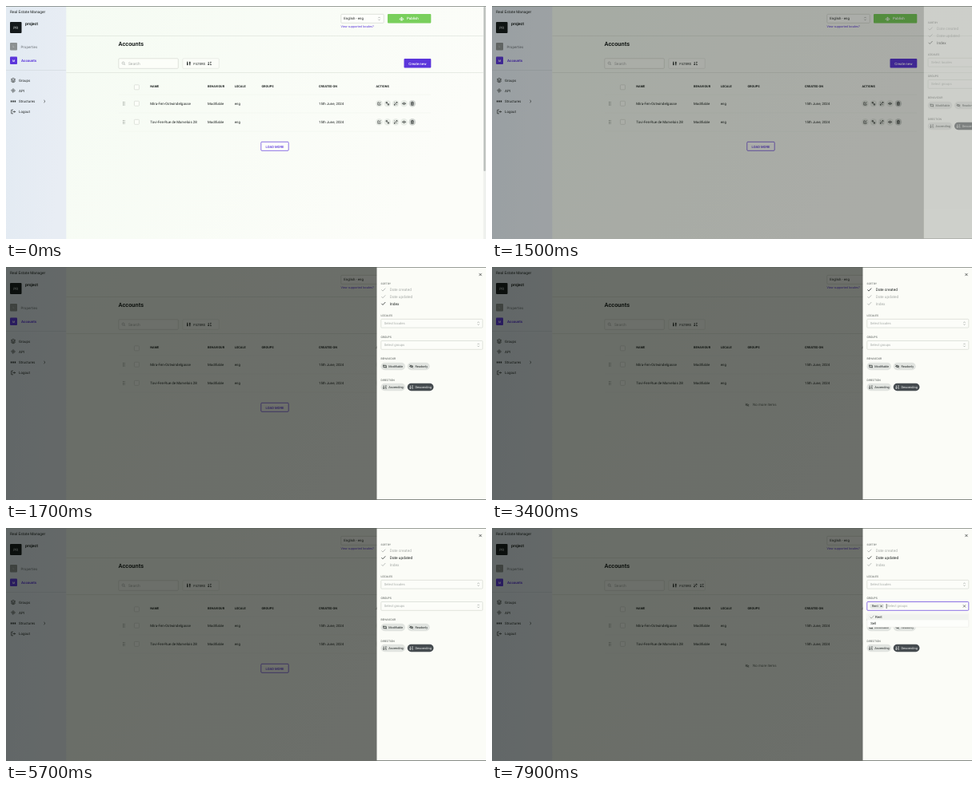
An HTML page that plays this animation: 600 by 292 pixels, repeating every 8 s.

```html
<!DOCTYPE html>
<html lang="en">
<head>
<meta charset="utf-8">
<title>Accounts</title>
<style>
  html, body { margin: 0; width: 100%; height: 100%; overflow: hidden; background: #f9fcf6; }
  svg { display: block; width: 100vw; height: 100vh; }
  text { font-family: Roboto, "Open Sans", sans-serif; text-rendering: geometricPrecision; white-space: pre; }
</style>
</head>
<body>
<svg id="stage" viewBox="0 0 600 292" preserveAspectRatio="none"></svg>
<script>
const LOOP = 8000, FRAME = 100, DRAWER_W = 136.5;
const INK = '#1f2423', PURPLE = '#5c36db', MUTED = '#a6aaa7', LINE = '#d5d9d2';

const ICONS = {
  check: 'M-2.4 0 L-.8 1.7 L2.5 -1.8',
  close: 'M-1.6 -1.6 L1.6 1.6 M1.6 -1.6 L-1.6 1.6',
  right: 'M-.8 -1.5 L.8 0 L-.8 1.5',
  updown: 'M-1.1 -.8 L0 -2 L1.1 -.8 M-1.1 .8 L0 2 L1.1 .8',
  search: 'M1.1 -.4 A1.5 1.5 0 1 1 -1.9 -.4 A1.5 1.5 0 1 1 1.1 -.4 M.7 .7 L2 2',
  sort: 'M-1.3 -2 V2 M-2.2 1 L-1.3 2 L-.4 1 M.5 -1.6 H2.2 M.5 0 H1.8 M.5 1.6 H2.4',
  sliders: 'M-1.5 -2.3 V2.3 M1.5 -2.3 V2.3 M-2.3 .9 H-.7 M.7 -.9 H2.3',
  layers: 'M0 -2.6 L2.6 -1.2 L0 .2 L-2.6 -1.2 Z M-2.6 .2 L0 1.6 L2.6 .2 M-2.6 1.5 L0 2.9 L2.6 1.5',
  hub: 'M0 -2.4 L2.4 0 L0 2.4 L-2.4 0 Z M-.8 0 H.8 M0 -.8 V.8',
  blocks: 'M-2.4 -.9 V.9 M0 -.9 V.9 M2.4 -.9 V.9',
  exit: 'M0 -2.3 H-2.3 V2.3 H0 M-.8 0 H2.6 M1.4 -1.2 L2.6 0 L1.4 1.2',
  edit: 'M.2 -1.5 H-1.7 V1.8 H1.5 V.3 M-.3 .4 L2 -1.9',
  link: 'M-1.8 -1.8 H-.4 V-.4 H-1.8 Z M.4 .4 H1.8 V1.8 H.4 Z M-.4 -.4 L.4 .4',
  expand: 'M.4 -1.8 H1.8 V-.4 M1.8 -1.8 L-1.8 1.8 M-.4 1.8 H-1.8 V.4 M-1.8 -1.6 L-.6 -.5 M.7 .8 L1.8 1.8',
  eye: 'M-2.3 0 Q0 -2.6 2.3 0 Q0 2.6 -2.3 0 Z M-.4 0 A.4 .4 0 1 0 .4 0 A.4 .4 0 1 0 -.4 0',
  bin: 'M-1.8 -1.3 H1.8 M-.6 -1.3 V-2 H.6 V-1.3 M-1.3 -1.3 V2 H1.3 V-1.3 M-.4 -.3 V1.1 M.4 -.3 V1.1',
  swap: 'M-2.2 -1.2 H1.7 V1.8 M2.2 1.2 H-1.6 V-1.9',
  hidden: 'M-2.2 0 Q0 -2.4 2.2 0 Q0 2.4 -2.2 0 Z M-2 -2 L2 2',
  globe: 'M-2.6 1 Q0 -3.6 2.6 1 M-2.6 1 H2.6 M0 -2 V2.2 M-1.4 2.2 H1.4'
};

const text = (s, x, y, size, fill = INK, weight = 400, extra = '') =>
  `<text x="${x}" y="${y}" font-size="${size}" fill="${fill}" font-weight="${weight}" ${extra}>${s}</text>`;
const centred = (s, x, y, size, fill, weight) => text(s, x, y, size, fill, weight, 'text-anchor="middle"');
const box = (x, y, w, h, fill, r = 0, stroke = 'none', extra = '') =>
  `<rect x="${x}" y="${y}" width="${w}" height="${h}" rx="${r}" fill="${fill}" stroke="${stroke}" stroke-width=".7" ${extra}/>`;
const icon = (name, x, y, stroke = INK, width = .65) =>
  `<path d="${ICONS[name]}" transform="translate(${x} ${y})" fill="none" stroke="${stroke}" stroke-width="${width}"/>`;
const rule = (x, y, w, fill) => box(x, y, w, .7, fill);
const group = (id, ...parts) => `<g id="${id}">${parts.join('')}</g>`;

function sidebar() {
  const links = [['layers', 'Groups', 93], ['hub', 'API', 106], ['blocks', 'Structures', 119.5], ['exit', 'Logout', 132.5]];
  return [
    box(0, 0, 75.3, 292, 'url(#side)'),
    text('Real Estate Manager', 5, 9.4, 4.8),
    box(5, 20, 14.5, 14, '#14191b', 1),
    centred('PR', 12.2, 28.6, 4.6, '#d5dad8'),
    text('project', 24, 24.3, 5.1, INK, 700),
    box(5, 46, 9, 9.5, '#8c9192', 1),
    centred('L', 9.5, 52, 3.6, '#d8dcdb'),
    text('Properties', 18.5, 52.6, 4.5, '#6d7378'),
    box(5, 63.5, 9, 9.5, PURPLE, 1),
    centred('M', 9.5, 69.5, 3.6, '#f0edff', 600),
    text('Accounts', 19, 70, 4.5, PURPLE, 600),
    rule(0, 80, 75, '#d3dae0'),
    ...links.map(([name, label, y]) => icon(name, 9, y, INK, name === 'blocks' ? 1.5 : .65) + text(label, 16, y + 1.6, 4.45)),
    icon('right', 48.2, 119.5)
  ].join('');
}

function header() {
  return [
    rule(75.3, 37.3, 525, '#dfe4db'), rule(75.3, 83.2, 525, '#dfe4db'),
    box(418.8, 10.3, 53.5, 11, '#fdfefb', 1, LINE),
    text('English - eng', 422.3, 17.4, 4.35),
    icon('updown', 466.5, 15.9, '#777d78', .5),
    text('View supported locales?', 418.5, 26.9, 3.8, PURPLE),
    box(477, 10, 54.3, 11.5, '#79cf5c', 1),
    icon('globe', 494.5, 15.8, '#fff', .7),
    text('Publish', 501, 17.4, 4.45, '#fff', 500),
    text('Accounts', 140.5, 49.6, 7.4, INK, 700),
    box(140.8, 65.8, 74.5, 12.5, '#fcfef9', 1, LINE),
    icon('search', 147, 72, '#959b96', .55),
    text('Search', 153, 73.6, 4.8, MUTED),
    box(220.8, 65.8, 45.5, 12.5, '#fbfdf8', 1, '#e3e7e0'),
    icon('sliders', 228.3, 72, INK, 1.1),
    text('FILTERS', 234.3, 73.5, 4.1),
    group('sortIcon', icon('sort', 254.5, 72, INK, .75)),
    group('filterMark', icon('expand', 254.2, 72, INK, .7)),
    box(497.5, 66, 33.8, 11.5, PURPLE, 1),
    centred('Create new', 514.4, 73.5, 4.4, '#fff', 500)
  ].join('');
}

function row(name, y) {
  const dots = [-1.8, 0, 1.8].map(d => box(146, y + d - .4, .8, .8, '#69706b') + box(147.7, y + d - .4, .8, .8, '#69706b')).join('');
  const actions = ['edit', 'link', 'expand', 'eye', 'bin'].map((a, i) => {
    const x = 466.5 + i * 10.35;
    return `<circle cx="${x}" cy="${y}" r="4.3" fill="${a === 'bin' ? '#d2d6d2' : '#e9ede7'}"/>` + icon(a, x, y, INK, .6);
  }).join('');
  return dots + box(160.4, y - 3.1, 6, 6, '#fcfef9', .8, LINE) + text(name, 180.3, y + 1.5, 4.5) +
    text('Modifiable', 252, y + 1.5, 4.35) + text('eng', 285.7, y + 1.5, 4.4) +
    text('15th June, 2024', 391, y + 1.5, 4.4) + actions + rule(141, y + 11.3, 390, '#f0f4ed');
}

function table() {
  const heads = [['NAME', 180.3], ['BEHAVIOUR', 252], ['LOCALE', 285.7], ['GROUPS', 319.5], ['CREATED ON', 391], ['ACTIONS', 462.5]];
  return [
    box(160.4, 98.8, 6, 6, '#fcfef9', .8, LINE),
    ...heads.map(([s, x]) => text(s, x, 102.3, 3.85, INK, 700)),
    rule(141, 110.7, 390, '#f0f4ed'),
    row('Mira-Fen-Ostwindelgasse', 122.3),
    row('Tovi-Fen-Rue de Marvelois 28', 145.4),
    group('more', box(318.8, 170.3, 34.4, 11, '#fdfefb', 1, PURPLE), centred('LOAD MORE', 336, 177.5, 4.15, PURPLE, 500)),
    group('noMore', icon('hidden', 319, 172.8, '#5f6660'), text('No more items', 326, 174.4, 4.5, '#5f6660'))
  ].join('');
}

function pill(x, y, w, name, label, size, dark) {
  const ink = dark ? '#f2f4f2' : INK;
  return box(x, y, w, 9.4, dark ? '#454b4f' : '#e1e4e0', 4.7) + icon(name, x + 5, y + 4.7, ink, .7) +
    text(label, x + 9.8, y + 6.1, size, ink);
}

function drawer() {
  const label = (s, y, size = 3.45) => text(s, 468.5, y, size, '#505653');
  const sorts = ['Date created', 'Date updated', 'Index'].map((s, i) => {
    const y = 28.4 + i * 8.7;
    return group('sort' + i, icon('check', 471.8, y, 'currentColor', .75), text(s, 479.8, y + 1.7, 4.8, 'currentColor'));
  });
  return [
    box(463.5, 0, DRAWER_W, 291.2, '#fbfcf7'),
    icon('close', 593, 9.5, INK, .65),
    label('SORT BY', 21.7, 3.2), ...sorts,
    label('LOCALES', 61.7),
    box(468.8, 65.3, 127, 10.8, '#fcfdf9', 1, LINE),
    text('Select locales', 472.8, 72.2, 4.2, MUTED),
    icon('updown', 590.5, 70.7, '#777d78', .5),
    label('GROUPS', 89),
    box(468.8, 92.5, 127, 10.8, '#fcfdf9', 1, LINE, 'id="field"'),
    group('tag', box(472, 94.6, 18, 6.6, '#e6e9e6', 3.3), text('Rent', 475, 99.2, 3.8),
      `<g transform="translate(486.6 97.9) scale(.75)">${icon('close', 0, 0, INK, .8)}</g>`),
    text('Select groups', 472.8, 99.4, 4.2, MUTED, 400, 'id="hint"'),
    box(472.4, 95, .6, 6, INK, 0, 'none', 'id="caret"'),
    group('arrows', icon('updown', 590.5, 97.9, '#777d78', .5)),
    group('clear', icon('close', 590.5, 97.9, INK, .55)),
    label('BEHAVIOUR', 116.3),
    pill(468.5, 119.8, 30.5, 'swap', 'Modifiable', 3.8),
    pill(501.7, 119.8, 28, 'hidden', 'Readonly', 3.8),
    label('DIRECTION', 142.6),
    pill(468.5, 145.8, 30.5, 'sort', 'Ascending', 3.95),
    pill(501.7, 145.8, 32.8, 'sort', 'Descending', 3.9, true),
    group('menu', box(468.8, 106.8, 127, 17.4, '#fdfefb', .8, '#eceeea'),
      group('picked', box(469.5, 107.8, 125.8, 7.6, '#f1f3ef'), icon('check', 475, 111.5, '#777d78', .6)),
      text('Rent', 473.3, 113, 4.3, INK, 400, 'id="rent"'), text('Sell', 473.3, 121.3, 4.3))
  ].join('');
}

const gradient = (id, a, b) =>
  `<linearGradient id="${id}" x2="1" y2=".3"><stop stop-color="${a}"/><stop offset="1" stop-color="${b}"/></linearGradient>`;

const stage = document.getElementById('stage');
stage.innerHTML = [
  '<defs>', gradient('page', '#f4fbf2', '#fcfdf9'), gradient('side', '#e2eaf2', '#e8edf4'), '</defs>',
  box(0, 0, 600, 292, 'url(#page)'),
  sidebar(), header(), table(),
  group('scrollbar', box(596.6, 0, 3.4, 292, '#eff1ee'), box(597, 1, 2.6, 206, '#bfc3c0', 1.2)),
  box(0, 0, 600, 292, '#060a05', 0, 'none', 'id="shade"'),
  group('drawer', drawer()),
  box(0, 0, 600, .6, '#59615b')
].join('');

const el = {};
stage.querySelectorAll('[id]').forEach(n => el[n.id] = n);
const show = (node, on) => node.setAttribute('opacity', +on);
const clamp = v => Math.min(1, Math.max(0, v));
const easeOut = v => 1 - (1 - clamp(v)) ** 2;
const during = (t, from, to) => t >= from && t < to;

function draw(t) {
  const open = easeOut((t - 1447) / 210);
  show(el.scrollbar, t < 1200);
  show(el.shade, .58 * clamp(open * 1.3));
  show(el.drawer, open);
  el.drawer.setAttribute('transform', `translate(${DRAWER_W * (1 - open)} 0)`);

  const chosen = t < 3400 ? 2 : t < 4600 ? 0 : 1;
  for (let i = 0; i < 3; i++) el['sort' + i].setAttribute('color', i === chosen ? INK : MUTED);

  // The list is briefly empty after each change of filter.
  const picked = t >= 7900;
  const loading = during(t, 3400, 3500) || during(t, 4600, 4700) || picked;
  show(el.more, !loading);
  show(el.noMore, loading);

  const focused = t >= 6000;
  el.field.setAttribute('stroke', focused ? PURPLE : LINE);
  show(el.menu, clamp((t - 5900) / 200));
  show(el.caret, focused && !during(t, 6600, 7200));
  for (const id of ['tag', 'clear', 'picked', 'filterMark']) show(el[id], picked);
  show(el.arrows, !picked);
  el.caret.setAttribute('x', picked ? 492.8 : 472.4);
  el.hint.setAttribute('x', picked ? 494 : 472.8);
  el.rent.setAttribute('x', picked ? 479 : 473.3);
  el.sortIcon.setAttribute('transform', `translate(${picked ? 7.8 : 0} 0)`);
}

const start = performance.now();
function tick() {
  const t = (performance.now() - start) % LOOP;
  draw(Math.floor(t / FRAME) * FRAME);
  requestAnimationFrame(tick);
}
tick();
</script>
</body>
</html>
```
